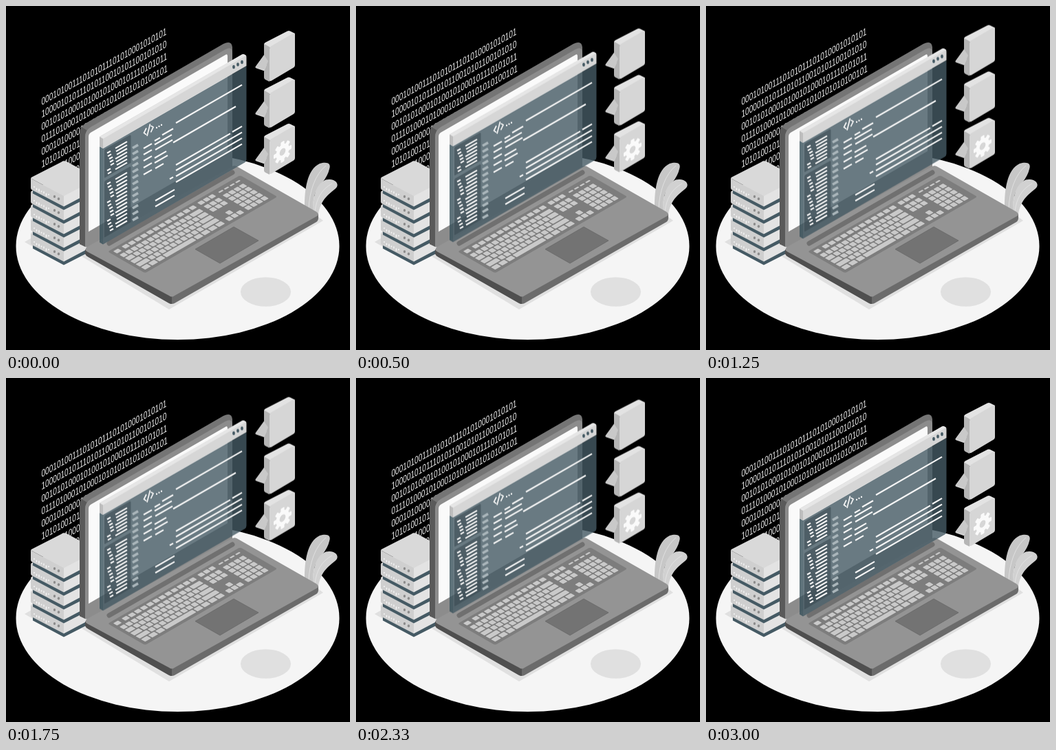
Write an HTML page that moves like this. It is 500x500 px and loops after 3.04 s.

```html
<!DOCTYPE html>
<html lang="en">
<head>
<meta charset="utf-8">
<title>Isometric laptop</title>
<style>
  html, body { margin: 0; width: 100%; height: 100%; overflow: hidden; background: #000; }
  svg { display: block; width: 100vw; height: 100vh; }
  .float { animation: float 3040ms linear infinite; }
  @keyframes float {
    0%, 98.684%, 100% { transform: translateY(0); }
    49.342% { transform: translateY(-10px); }
  }
  #binary { font: 15px "Liberation Sans", Arial, sans-serif; fill: #ebebeb; }
  #code { fill: none; stroke: #f5f5f5; stroke-width: 2.1; }
  #numbers { fill: none; stroke: #a9b5ba; stroke-width: 3.6; }
</style>
</head>
<body>
<svg viewBox="0 0 500 500">
  <g id="binary"></g>

  <ellipse cx="249.5" cy="349" rx="235" ry="136" fill="#f5f5f5"/>
  <ellipse cx="377.5" cy="415.5" rx="36.5" ry="21.3" fill="#e0e0e0"/>
  <path d="M27 343L84 310L130 346L76 371Z" fill="#e0e0e0"/>
  <path d="M110 364L237 441L461 312L440 296L130 350Z" fill="#e0e0e0"/>

  <g id="servers"></g>

  <g stroke="#e6e6e6" stroke-width=".8">
    <path d="M434 292C434 268 437 238 456 229C467 226 473 229 470 237C467 251 455 261 450 271C446 280 446 290 447 300Z" fill="#c7c7c7" stroke="none"/>
    <path d="M440 294C441 270 449 245 465 232" fill="none"/>
    <path d="M446 300C446 276 451 258 465 252.500C477 250 484 257 481 263C475 271 459 276 454 302Z" fill="#d1d1d1" stroke="none"/>
    <path d="M449 299C451 280 459 266 474 258" fill="none"/>
  </g>

  <!-- laptop lid -->
  <path d="M107 346V185Q107 176 115 171L316 55Q328 49 329 60V240L117 350Z" fill="#757575"/>
  <path d="M107 346V185Q107 180 110 176L118 181Q115 185 115 190V350Z" fill="#5a5a5a"/>
  <path d="M115 350V190Q115 181 123 176L319 63Q329 58 329 68V240L119 351Z" fill="#8c8c8c"/>
  <path d="M120 328V190Q120 186 123 184L319 71Q322 69 322 73V211Z" fill="#fafafa"/>

  <!-- laptop base -->
  <path d="M115 354V360Q116 363 120 365L237 432Q241 434 245 432L451 314Q454 312 454 308V302Z" fill="#6b6b6b"/>
  <path d="M115 354V360Q116 363 120 365L237 432Q239 433 241 433V422Z" fill="#4f4f4f"/>
  <path d="M118 350L329 233Q333 231 337 234L451 299Q457 303 451 306L245 421Q241 424 237 421L118 357Q113 354 118 350Z" fill="#949494"/>
  <path d="M150 345L329 242" stroke="#707070" stroke-width="7" stroke-linecap="round"/>
  <path d="M275 353.500L331 321L367 341L311 374Z" fill="#737373" stroke="#686868" stroke-width=".8"/>
  <g id="keys" transform="matrix(.866 -.5 .866 .5 148 357)" fill="#c9c9c9">
    <rect width="222" height="62.500" rx="3" fill="#7d7d7d"/>
  </g>

  <!-- floating window -->
  <g class="float">
    <g fill="#455a64" fill-opacity=".8">
      <path d="M141 207L349.500 87V223Q349.500 226 347 227.500L141 346.500Z"/>
      <path d="M136 204L141 207V346.500L136 343.500Z" fill="#37505b"/>
      <path d="M144 208L180 187.500Q181.500 187 181.500 189V228L144 249.500Q143 250 143 248.500V210Z" fill="#37474f" fill-opacity=".55"/>
      <path d="M144 254L180 233.500Q181.500 233 181.500 235V314L144 336Q143 336.500 143 335V256Z" fill="#37474f" fill-opacity=".55"/>
    </g>
    <path d="M136 204V191Q136 190 137 189.300L343 70.500Q345 69.500 346.500 70.500L349 72Q349.500 73 349.500 75V87L141 207Z" fill="#d6d6d6"/>
    <path d="M136.500 190L343 70.500Q345 69.500 346.500 70.500L349 72L141 193Z" fill="#e6e6e6"/>
    <path d="M136 190L141 193V207L136 204Z" fill="#bdbdbd"/>
    <g fill="#455a64">
      <ellipse cx="331" cy="88.500" rx="1.900" ry="2.700"/>
      <ellipse cx="337" cy="85" rx="1.900" ry="2.700"/>
      <ellipse cx="343" cy="81.500" rx="1.900" ry="2.700"/>
    </g>
    <path id="numbers"/>
    <path id="code"/>
    <g fill="none" stroke="#f5f5f5" stroke-width="1.700">
      <path d="M204 177.500L200.500 184.500L204 187M209.500 171.500L205 189M210.500 174L214 176L210.500 183.500"/>
      <path d="M219 178V175.800M222.500 176V173.800M226 174V171.800" stroke-width="2"/>
    </g>
  </g>

  <g class="float" id="bubbles"></g>
</svg>
<script>
  const put = (id, markup) => document.getElementById(id).insertAdjacentHTML('beforeend', markup);
  const range = n => [...Array(n).keys()];
  const SLOPE = 0.577;
  // A stroke along the receding axis, from x1 to x2
  const line = (x1, y, x2) => `M${x1} ${y}L${x2} ${y - (x2 - x1) * SLOPE}`;

  const rows = [
    '000101001110101011101010001010101',
    '100001010111010110010101100101010',
    '001010100010100101000101110101011',
    '011101000101000101010101010100101',
    '000101000010100101',
    '101010010110010101',
    '010010100011001010',
    '101001011010110100'
  ];
  put('binary', rows.map((row, i) =>
    `<text transform="matrix(.672 -.381 0 1 51.5 ${144.5 + i * 18.2})">${row}</text>`).join(''));

  const server = y => {
    const leds = range(7).map(i => {
      const x = 41 + i * 3.5;
      return `M${x} ${11.5 + i * 1.85 + i % 2}v${2 + i % 3}`;
    }).join('');
    return `<g transform="translate(0 ${y})">
      <path d="M39 16L84 40L131 16V22L84 46L39 22Z" fill="#455a64"/>
      <path d="M36 0L84 25.500V41L38 17Q36 16 36 14Z" fill="#cfcfcf"/>
      <path d="M84 25.500L133 0V15L84 41Z" fill="#e3e3e3"/>
      <path d="M36 0Q36 -1 38 -2L82 -24.500Q85 -26 88 -24.500L133 0L84 25.500Z" fill="#d9d9d9"/>
      <path d="${leds}" stroke="#f5f5f5" stroke-width="1.500"/>
      <ellipse cx="70.500" cy="26.500" rx="1.700" ry="2.100" fill="#8c8c8c"/>
      <ellipse cx="76.500" cy="29.800" rx="1.700" ry="2.100" fill="#8c8c8c"/>
    </g>`;
  };
  put('servers', range(5).reverse().map(i => server(250.5 + i * 20)).join(''));

  const key = (u, v, w = 7.4, h = 7.2) => `<rect x="${u}" y="${v}" width="${w}" height="${h}" rx="1"/>`;
  const keyRow = (u, v, n) => range(n).map(i => key(u + i * 9, v)).join('');
  let keys = key(5, 4, 8, 6.5);
  for (let i = 0; i < 12; i++) keys += key(19 + i * 10.2, 4, 8, 6.5);
  for (let i = 0; i < 3; i++) keys += key(146 + i * 9, 4, 7.4, 6.5);
  for (let i = 0; i < 4; i++) keys += key(179 + i * 9.5, 6, 7, 2.5);
  keys += keyRow(5, 14.5, 13) + key(122, 14.5, 17);
  keys += key(5, 23.5, 11) + keyRow(18, 23.5, 12) + key(126, 23.5, 13);
  keys += key(5, 32.5, 14) + keyRow(21, 32.5, 11) + key(120, 32.5, 19);
  keys += key(5, 41.5, 18) + keyRow(25, 41.5, 10) + key(115, 41.5, 24);
  keys += range(3).map(i => key(5 + i * 12, 50.5, 10)).join('');
  keys += key(41, 50.5, 50) + range(4).map(i => key(93 + i * 12, 50.5, 10)).join('');
  keys += keyRow(146, 14.5, 3) + keyRow(146, 23.5, 3) + key(155, 41.5) + keyRow(146, 50.5, 3);
  for (let i = 0; i < 5; i++) keys += keyRow(178, 14.5 + i * 9, 4);
  put('keys', keys);

  const code = [
    [247, 170, 343], [216, 196, 224], [227, 187.5, 243],
    [200, 207, 212], [216, 201.5, 241], [243, 198.5, 334],
    [200, 216, 212], [217, 209, 242],
    [200, 225, 212], [216, 221, 233],
    [200, 235, 212], [216, 228, 235],
    [200, 245, 212], [217, 236, 229],
    [238, 251.5, 243], [247, 231, 326], [329, 183, 343],
    [247, 239, 343], [247, 247.5, 343], [247, 256, 343],
    [217, 283, 245], [217, 291.5, 245]
  ];
  const list = (n, y, pitch) => {
    for (let i = 0; i < n; i++) {
      const top = y + i * pitch, indent = [0, 3, 5, 1, 4][i * 3 % 5];
      code.push([147 + indent, top + (10 - indent) * SLOPE, 152 + indent]);
      code.push([159 + i % 3, top - (2 + i % 3) * SLOPE, 176]);
    }
  };
  list(7, 208, 5.1);
  list(14, 253, 5.4);
  document.getElementById('code').setAttribute('d', code.map(c => line(...c)).join(''));
  document.getElementById('numbers').setAttribute('d',
    range(13).map(i => line(184, 206.5 + i * 8.75, 192)).join(''));

  const bubble = y => `<g transform="translate(0 ${y})">
    <path d="M375 72L362.500 88.500Q362 90 364 90.500L377 95L383 84Z" fill="#d1d1d1"/>
    <path d="M375 56Q375 54 377 53L409 36.500Q411 35.500 413 36.500L420 40L383 61Z" fill="#e3e3e3"/>
    <path d="M375 55L383 59.500V110L377 107Q375 106 375 104V95L379 86L375 80Z" fill="#b5b5b5"/>
    <path d="M375 71L362.500 88.500L376 92L381 80Z" fill="#c9c9c9"/>
    <path d="M383 62Q383 59.500 385 58.500L417 40Q420 38.500 420 41V86Q420 88 418 89.500L386 108.500Q383 110 383 108Z" fill="#d6d6d6"/>
  </g>`;
  const teeth = range(8).map(i =>
    `<rect x="-3" y="-15" width="6" height="7" rx="1.200" fill="#fafafa" transform="rotate(${i * 45})"/>`).join('');
  put('bubbles', range(3).map(i => bubble(i * 67.5)).join('') +
    `<g transform="matrix(.866 -.5 0 1 402 212)">
      <circle r="8" fill="none" stroke="#fafafa" stroke-width="6"/>${teeth}
    </g>`);
</script>
</body>
</html>
```
